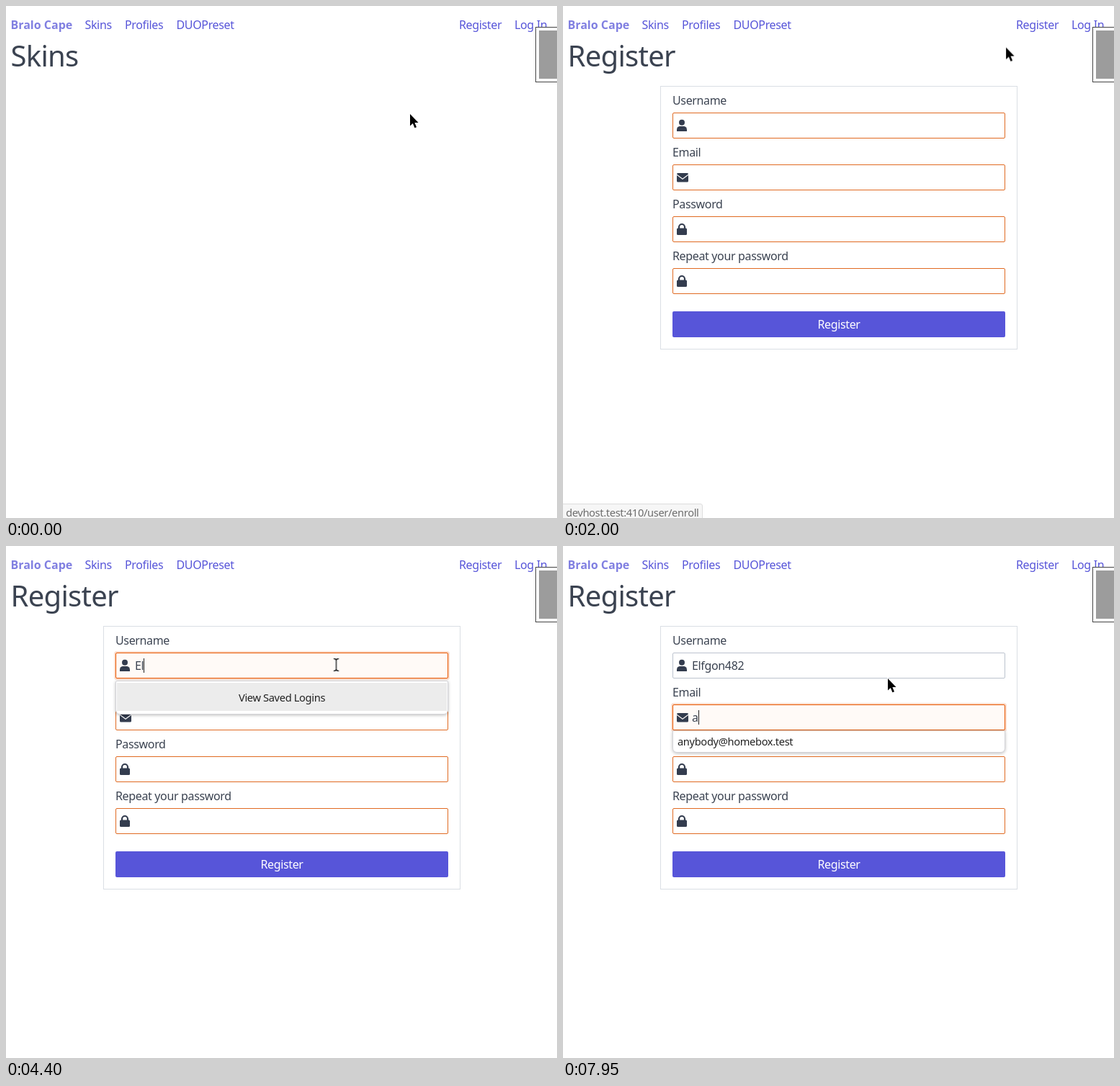
These frames come from a looping animation (765x711 px, 8 s). An HTML page:

```html
<!DOCTYPE html>
<html lang="en">
<head>
<meta charset="utf-8">
<title>Register form</title>
<style>
@property --n { syntax: "<integer>"; inherits: true; initial-value: 0; }
html, body { margin: 0; width: 100%; height: 100%; overflow: hidden; background: #fff; }
body {
  position: relative; color: #3b4351; white-space: pre;
  font: 16px/24px "Noto Sans", "Open Sans", sans-serif; letter-spacing: -.022em;
}
body *, .cursor g { animation: 0s step-end infinite; }
nav span, h1, .form, label, .field, .field svg, .button, .list, .status, .more, .tool, .cursor { position: absolute; }
nav span, .more { top: 14px; color: #5755d9; }
nav .brand { color: #807fe1; font-weight: 700; letter-spacing: 0; }
h1 { margin: 0; left: 6.5px; top: 45px; font-size: 40px; line-height: 48px; font-weight: 400; letter-spacing: -.018em; }

.form { left: 135px; top: 111px; width: 494px; height: 364px; border: 1px solid #dadee4; }
label { left: 16px; }
.field, .button { left: 16px; width: 462px; height: 36px; box-sizing: border-box; border-radius: 2px; line-height: 36px; }
.field { border: 1px solid #e06a22; padding-left: 26px; line-height: 35px; background: #fff; }
.field svg { left: -1px; top: -1px; width: 26px; height: 36px; fill: #333c4e; }
.button { top: 312px; background: #5755d9; color: #fff; text-align: center; line-height: 37px; }
.typed i { font-style: normal; font-size: calc(16px * clamp(0, var(--n) - var(--i), 1)); }
.caret { display: inline-block; width: 1.4px; height: 20px; vertical-align: -4px; background: #222; }

.list {
  left: 16px; width: 460px; box-sizing: content-box; background: #fff; border: 1px solid #d4d4d8;
  border-radius: 2px 2px 6px 6px; box-shadow: 0 1px 4px #0004; color: #222; font-size: 14.67px;
}
.logins { top: 75px; height: 45px; }
.logins div { margin: 2px 1px 0; height: 39px; line-height: 41px; background: #ececec; text-align: center; }
.mails { top: 144px; height: 29px; line-height: 29px; text-indent: 6px; }
.status {
  left: -1px; bottom: -1px; height: 19px; padding: 0 4px; line-height: 23px; font-size: 14.67px; color: #222;
  background: #f1f1f1; border: 1px solid #ccc; border-radius: 0 3px 0 0;
}
nav .more { left: -1px; top: 486px; }
.tool { left: 735px; top: 29px; width: 40px; height: 75px; background: #fff; border: 1px solid #444; }
.tool::before { content: ""; position: absolute; left: 4px; top: 4px; width: 36px; height: 67px; background: #9c9c9c; }
.cursor { left: 0; top: 0; width: 1px; height: 1px; overflow: visible; }

body .old { animation: old 8s step-end infinite; }
body .new { animation: new 8s step-end infinite; }
body .tool { animation: tool 8s step-end infinite; }
body .more { animation: more 8s step-end infinite; }
body .status { animation: status 8s linear infinite; }
body .logins { animation: logins 8s step-end infinite; }
body .mails { animation: mails 8s step-end infinite; }
body .name { animation: name 8s linear infinite; }
body .mail { animation: mail 8s linear infinite; }
.name .typed { animation: typeName 8s step-end infinite; }
.mail .typed { animation: typeMail 8s step-end infinite; }
.name .caret { animation: caretName 8s step-end infinite; }
.mail .caret { animation: caretMail 8s step-end infinite; }
body .cursor { animation: move 8s ease-in-out infinite; }
.cursor .arrow { animation: arrow 8s step-end infinite; }
.cursor .hand { animation: hand 8s step-end infinite; }
.cursor .beam { animation: beam 8s step-end infinite; }

@keyframes old { 0% { opacity: 1 } 18.1%, to { opacity: 0 } }
@keyframes new { 0% { opacity: 0 } 18.1%, to { opacity: 1 } }
@keyframes tool { 0% { opacity: 1 } 18.1% { opacity: 0 } 21.2%, to { opacity: 1 } }
@keyframes more { 0% { opacity: 0 } 18.1% { opacity: 1 } 21.2%, to { opacity: 0 } }
@keyframes status { 0%, 11.8% { opacity: 0 } 11.85%, 24.4% { opacity: 1 } 26.2%, to { opacity: 0 } }
@keyframes logins { 0% { opacity: 0 } 33.1% { opacity: 1 } 89.9%, to { opacity: 0 } }
@keyframes mails { 0% { opacity: 0 } 96.2%, to { opacity: 1 } }
@keyframes name {
  0%, 31.9% { border-color: #e06a22; box-shadow: 0 0 0 2px #e8560000; background: #fff }
  34.3%, 44% { border-color: #e85600; box-shadow: 0 0 0 2px #e8560033; background: #fff }
  44.3%, 66.2% { border-color: #e85600; box-shadow: 0 0 0 2px #e8560033; background: #fffaf7 }
  68.7%, 90% { border-color: #5755d9; box-shadow: 0 0 0 2px #5755d933; background: #fff }
  92.5%, to { border-color: #bcc3ce; box-shadow: 0 0 0 2px #5755d900; background: #fff }
}
@keyframes mail {
  0%, 90% { border-color: #e06a22; box-shadow: 0 0 0 2px #e8560000; background: #fff }
  92.5%, 95.6% { border-color: #e85600; box-shadow: 0 0 0 2px #e8560033; background: #fff }
  98.1%, to { border-color: #e85600; box-shadow: 0 0 0 2px #e8560033; background: #fffaf7 }
}
@keyframes typeName {
  0% { --n: 0 } 44.3% { --n: 1 } 51.8% { --n: 2 } 58.1% { --n: 3 } 59.9% { --n: 4 }
  66.2% { --n: 5 } 69.9% { --n: 6 } 76.2% { --n: 7 } 79.3% { --n: 8 } 84.3%, to { --n: 9 }
}
@keyframes typeMail { 0% { --n: 0 } 95.6%, to { --n: 1 } }
@keyframes caretName { 0% { opacity: 0 } 31.8% { opacity: 1 } 89.9%, to { opacity: 0 } }
@keyframes caretMail { 0% { opacity: 0 } 89.9%, to { opacity: 1 } }
@keyframes move {
  0%, .5% { transform: translate(561px, 150px) }
  10.6% { transform: translate(655px, 25px) }
  18.8%, 22.4% { transform: translate(645px, 37px) }
  31.8%, 94.9% { transform: translate(458.5px, 165px) }
  98.8%, to { transform: translate(451px, 184px) }
}
@keyframes arrow { 0% { opacity: 1 } 7.5% { opacity: 0 } 24.2% { opacity: 1 } 29.3% { opacity: 0 } 98%, to { opacity: 1 } }
@keyframes hand { 0% { opacity: 0 } 7.5% { opacity: 1 } 24.2%, to { opacity: 0 } }
@keyframes beam { 0% { opacity: 0 } 29.3% { opacity: 1 } 98%, to { opacity: 0 } }
</style>
</head>
<body>
<nav><span class="brand" style="left:6.5px">Bralo Cape</span><span style="left:109.5px">Skins</span><span style="left:165px">Profiles</span><span style="left:236.5px">DUOPreset</span><span style="left:629px">Register</span><span style="left:706px">Log In</span><span class="more">«</span></nav>
<h1 class="old">Skins</h1>
<h1 class="new">Register</h1>

<div class="form new"><label style="top:7px">Username</label><div class="field name" style="top:36px"><svg><circle cx="13" cy="13.8" r="4"/><path d="M6 26v-2.4a4.6 4.6 0 0 1 4.6-4.6h4.8a4.6 4.6 0 0 1 4.6 4.6V26z"/></svg><span class="typed"></span><b class="caret"></b></div><label style="top:79px">Email</label><div class="field mail" style="top:108px"><svg><path d="M6 13.5q0-1.5 1.5-1.5h13q1.5 0 1.5 1.5L14 19.5z"/><path d="M6 15l8 6 8-6v8q0 1.5-1.5 1.5h-13Q6 24.500 6 23z"/></svg><span class="typed"></span><b class="caret"></b></div><label style="top:151px">Password</label><div class="field" style="top:180px"><svg><g id="lock"><rect x="6" y="16.500" width="14" height="9.500" rx="1.500"/><path d="M9 18v-3a4 4 0 0 1 8 0v3" fill="none" stroke="#333c4e" stroke-width="2.200"/></g></svg></div><label style="top:223px">Repeat your password</label><div class="field" style="top:252px"><svg><use href="#lock"/></svg></div><div class="button">Register</div><div class="list logins"><div>View Saved Logins</div></div><div class="list mails">anybody@homebox.test</div></div>

<div class="status">devhost.test:410/user/enroll</div>
<div class="tool"></div>

<svg class="cursor">
  <g class="arrow"><path d="M0 0V16.500L3.800 13 6.400 19.300 9 18.200 6.400 12H11.500Z" stroke="#fff" stroke-width="1.600" paint-order="stroke"/></g>
  <g class="hand"><path d="M-2 1.500a1.500 1.500 0 0 1 3 0V6l6 1.200q2 .5 2 2.500l-.6 3.500-1.400 2.800h-8l-4-5q-1.500-2 .5-2.600l2.500 1.600z" stroke="#fff" stroke-width="1.600" paint-order="stroke"/></g>
  <g class="beam" fill="none">
    <path id="bar" d="M-3.500-8.500Q0-8.500 0-6V6Q0 8.500-3.500 8.500M3.500-8.500Q0-8.500 0-6M0 6Q0 8.500 3.500 8.500" stroke="#fff" stroke-width="3.200"/>
    <path d="M-3.500-8.500Q0-8.500 0-6V6Q0 8.500-3.500 8.500M3.500-8.500Q0-8.500 0-6M0 6Q0 8.500 3.500 8.500" stroke="#222" stroke-width="1.400"/>
  </g>
</svg>
<script>
// One element per letter, so the --n counter can reveal them in turn.
const fill = (field, text) => {
  const box = document.querySelector(field + " .typed");
  [...text].forEach((ch, i) => {
    const letter = document.createElement("i");
    letter.textContent = ch;
    letter.style.setProperty("--i", i);
    box.append(letter);
  });
};
fill(".name", "Elfgon482");
fill(".mail", "a");
</script>
</body>
</html>
```
